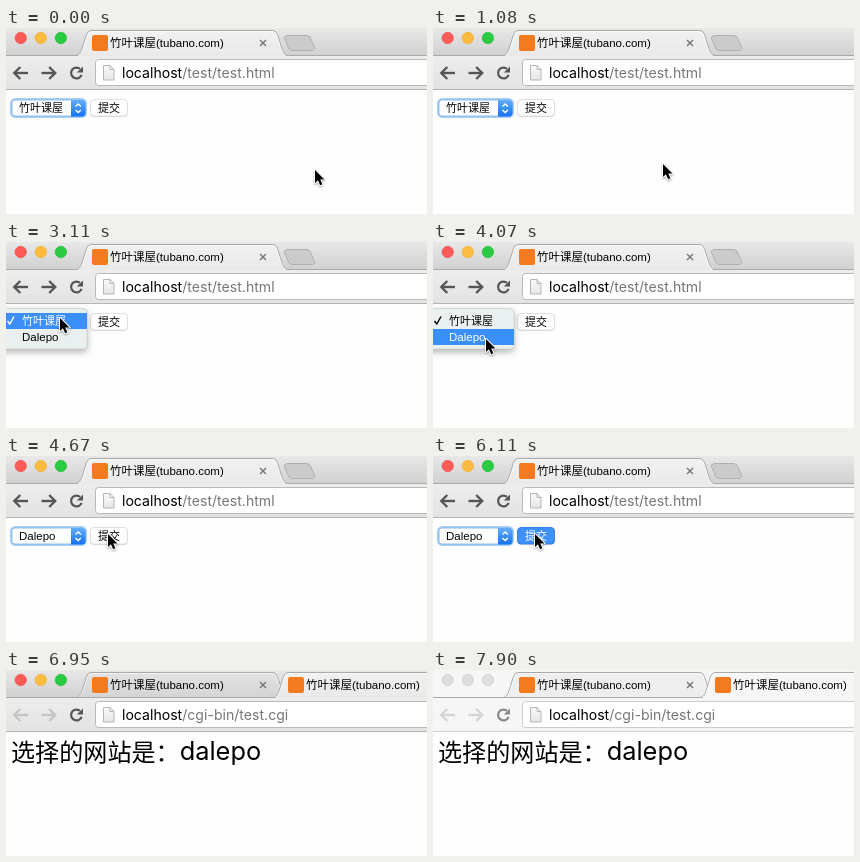
An HTML page with a canvas that plays this animation: 421x186 px, repeating every 8 s.

```html
<!DOCTYPE html>
<html lang="zh">
<head>
<meta charset="utf-8">
<title>Form demo</title>
<style>
html, body { margin: 0; width: 100%; height: 100%; overflow: hidden; background: #fff; }
canvas { display: block; width: 421px; height: 186px; }
</style>
</head>
<body>
<canvas id="stage"></canvas>
<script>
const W = 421, H = 186, LOOP = 8000, TICK = 120;
const FONT = '"Liberation Sans", "Noto Sans CJK SC", sans-serif';
const URL_FONT = 'Inter, sans-serif';
const SITE = '竹叶课屋', OTHER = 'Dalepo', TITLE = SITE + '(tubano.com)';

const canvas = document.getElementById('stage');
const dpr = window.devicePixelRatio || 1;
canvas.width = W * dpr;
canvas.height = H * dpr;
const c = canvas.getContext('2d');

function rect(x, y, w, h, fill) {
  c.fillStyle = fill;
  c.fillRect(x, y, w, h);
}

function box(x, y, w, h, r, fill, stroke, line = 1) {
  c.beginPath();
  c.roundRect(x, y, w, h, r);
  paint(fill, stroke, line);
}

function paint(fill, stroke, line = 1) {
  if (fill) { c.fillStyle = fill; c.fill(); }
  if (stroke) { c.strokeStyle = stroke; c.lineWidth = line; c.stroke(); }
}

function poly(points, close) {
  c.beginPath();
  points.forEach(([x, y], i) => i ? c.lineTo(x, y) : c.moveTo(x, y));
  if (close) c.closePath();
}

function text(s, x, y, size, color = '#000', weight = 400, family = FONT) {
  c.font = `${weight} ${size}px ${family}`;
  c.fillStyle = color;
  c.fillText(s, x, y);
  return x + c.measureText(s).width;
}

function fade(y0, y1, top, bottom) {
  const g = c.createLinearGradient(0, y0, 0, y1);
  g.addColorStop(0, top);
  g.addColorStop(1, bottom);
  return g;
}

// Cursor moves: start time, number of ticks, end point, optional upward bow
const START = [309, 142];
const MOVES = [
  { at: 720, n: 4, to: [230, 136] },
  { at: 1800, n: 7, to: [111.5, 83] },
  { at: 2640, n: 4, to: [54, 76], bow: 22 },
  { at: 3350, n: 2, to: [53, 97] },
  { at: 4310, n: 4, to: [102, 78] },
  { at: 6350, n: 5, to: [378, 182] }
];

function cursorAt(t) {
  let pos = START;
  for (const { at, n, to, bow = 0 } of MOVES) {
    if (t < at) break;
    const p = Math.min(1, (Math.floor((t - at) / TICK) + 1) / n);
    const e = p * p * (3 - 2 * p);
    pos = [
      pos[0] + (to[0] - pos[0]) * e,
      pos[1] + (to[1] - pos[1]) * e - bow * Math.sin(Math.PI * e)
    ];
  }
  return pos;
}

function drawCursor([x, y]) {
  c.save();
  c.translate(x, y);
  c.scale(0.92, 0.92);
  poly([[0, 0], [0, 14.2], [3.2, 11.2], [5.6, 16.6], [8, 15.5], [5.7, 10.3], [10.3, 10.3]], true);
  c.lineJoin = 'round';
  c.shadowColor = 'rgba(0,0,0,.35)';
  c.shadowBlur = 2 * dpr;
  c.shadowOffsetY = dpr;
  paint(null, '#fff', 2.2);
  c.shadowColor = 'transparent';
  paint('#000');
  c.restore();
}

function tabPath(x0, x1, y) {
  c.beginPath();
  c.moveTo(x0, 27.5);
  c.quadraticCurveTo(x0 + 3, 26.5, x0 + 4.5, 22.5);
  c.lineTo(x0 + 9.5, y + 4);
  c.quadraticCurveTo(x0 + 11, y, x0 + 14, y);
  c.lineTo(x1 - 14, y);
  c.quadraticCurveTo(x1 - 11, y, x1 - 9.5, y + 4);
  c.lineTo(x1 - 4.5, 22.5);
  c.quadraticCurveTo(x1 - 3, 26.5, x1, 27.5);
}

function tabShape(x0, x1, fill) {
  tabPath(x0, x1, 2.5);
  paint(fill, '#a9a9a9');
  tabPath(x0 + 1, x1 - 1, 3.5);
  paint(null, 'rgba(255,255,255,.6)');
}

function closeMark(x, y) {
  c.lineCap = 'butt';
  poly([[x - 3, y - 3], [x + 3, y + 3]]);
  paint(null, '#777', 1.4);
  poly([[x + 3, y - 3], [x - 3, y + 3]]);
  paint(null, '#777', 1.4);
}

function page(x, y, w, h, color, fill) {
  const k = 4;
  poly([[x, y], [x + w - k, y], [x + w, y + k], [x + w, y + h], [x, y + h]], true);
  paint(fill, color);
  poly([[x + w - k, y], [x + w - k, y + k], [x + w, y + k]]);
  paint(null, color);
}

function siteTab(x) {
  box(x, 7, 16, 16, 2, '#f47a20');
  text(TITLE, x + 18, 19, 11.5);
}

function arrow(x, dir, color) {
  c.lineCap = 'butt';
  c.lineJoin = 'miter';
  poly([[x + 7.5 * dir, 45], [x - 5.5 * dir, 45]]);
  paint(null, color, 2.4);
  poly([[x - dir * 0.2, 39], [x - 6.2 * dir, 45], [x - dir * 0.2, 51]]);
  paint(null, color, 2.4);
}

function reload(color) {
  c.beginPath();
  c.arc(70.5, 45, 5.4, 0.35, Math.PI * 1.72);
  paint(null, color, 2.2);
  poly([[77, 38.5], [77, 44.6], [70.8, 44.6]], true);
  paint(color);
}

function drawChrome(second, loaded, active) {
  rect(0, 0, W, 29, active ? fade(0, 28, '#e8e8e8', '#d0d0d0') : '#f6f6f6');
  const lights = active ? ['#fc5b57', '#fdbc40', '#2acb42'] : ['#dedede', '#dedede', '#dedede'];
  const rims = active ? ['#f0524c', '#eeae30', '#27bd3c'] : ['#cecece', '#cecece', '#cecece'];
  lights.forEach((color, i) => {
    c.beginPath();
    c.arc(14.7 + 20.1 * i, 10, 5.7, 0, Math.PI * 2);
    paint(color, rims[i], 0.7);
  });

  const tab = active ? fade(3, 28, '#f1f1f1', '#e9e9e9') : '#f6f6f6';
  const idle = active ? fade(3, 28, '#e2e2e2', '#d4d4d4') : '#eeeeee';
  const bar = active ? '#e9e9e9' : '#f6f6f6';
  rect(0, 27, W, 1, '#a9a9a9');
  if (!second) {
    poly([[281, 7.5], [301, 7.5], [304, 9], [309, 20.5], [307, 22.5], [286, 22.5], [283, 21], [278, 9.5]], true);
    paint('#cbcbcb', '#b0b0b0');
  }
  tabShape(71, 281, second ? idle : tab);
  siteTab(86);
  closeMark(257, 15);
  if (second) {
    rect(0, 27, W, 1, '#a9a9a9');
    tabShape(268, 470, tab);
    if (loaded) siteTab(282);
    else {
      page(285.5, 10.5, 9, 12, '#666', '#fff');
      text('无标题', 299.5, 21, 11.5);
    }
  }

  rect(0, 28, W, 33, active ? fade(28, 61, '#ededed', '#e3e3e3') : '#f6f6f6');
  const [x0, x1] = second ? [270, W] : [73, 279];
  rect(x0, 27, x1 - x0, 1, bar);
  rect(0, 61, W, 1, active ? '#b5b5b5' : '#cfcfcf');
  const dim = active ? '#c4c4c4' : '#d4d4d4';
  arrow(14.5, 1, second ? dim : '#555');
  arrow(43, -1, second ? dim : '#555');
  reload(active ? '#555' : '#888');
  box(89.5, 31.5, 345, 26, 3, '#fff', active ? '#b9b9b9' : '#cccccc');
  page(97.5, 37.5, 10.5, 14.5, '#b5b5b5', fade(37, 52, '#fbfbfb', '#e6e6e6'));
  const end = text('localhost', 116, 50, 14.1, '#000', 400, URL_FONT);
  text(second ? '/cgi-bin/test.cgi' : '/test/test.html', end, 50, 14.1, '#777', 400, URL_FONT);
}

function chevron(y, dir) {
  poly([[69.5, y], [72.2, y - 2.6 * dir], [74.9, y]]);
  paint(null, '#fff', 1.4);
}

function drawSelect(value) {
  box(5.5, 71.5, 74, 17, 4, '#fff', '#a9cef5', 3);
  box(6, 72, 73, 16, 3, '#fff', '#76aeea', 0.8);
  box(65, 72, 14.5, 16.5, [0, 3.5, 3.5, 0], fade(72, 88, '#63adfb', '#1673f5'));
  chevron(78.6, 1);
  chevron(82, -1);
  text(value, 13, 84, value === SITE ? 11 : 11.5);
}

function drawButton(pressed) {
  c.save();
  c.shadowColor = 'rgba(0,0,0,.18)';
  c.shadowBlur = dpr;
  c.shadowOffsetY = 0.7 * dpr;
  box(84.5, 71.5, 37, 16.5, 3.5, pressed ? '#3f91f8' : '#fff');
  c.restore();
  box(84.5, 71.5, 37, 16.5, 3.5, null, pressed ? '#2477e8' : '#d9d9d9', 0.8);
  text('提交', 92, 84, 11, pressed ? '#fff' : '#000');
}

function drawMenu(hover, alpha) {
  c.save();
  c.globalAlpha = alpha;
  c.shadowColor = 'rgba(0,0,0,.3)';
  c.shadowBlur = 7 * dpr;
  c.shadowOffsetY = 3 * dpr;
  box(-8, 66.5, 89, 40.5, 4, '#eaf0f0');
  c.shadowColor = 'transparent';
  box(-8, 66.5, 89, 40.5, 4, null, '#c8cccc', 0.7);
  rect(0, hover ? 87 : 71, 81, 16, '#3a90f8');
  const ink = i => i === hover ? '#fff' : '#000';
  poly([[1.5, 79], [3.8, 82], [8, 74.5]]);
  paint(null, ink(0), 1.4);
  text(SITE, 16, 83, 11, ink(0));
  text(OTHER, 16, 99, 11.5, ink(1));
  c.restore();
}

function drawForm(t) {
  drawSelect(t < 4190 ? SITE : OTHER);
  drawButton(t >= 6110);
  if (t >= 3110 && t < 4310) drawMenu(t < 3350 ? 0 : 1, t < 4190 ? 1 : 0.4);
}

function drawResult() {
  const end = text('选择的网站是：', 5, 91, 24.1, '#000', 500, '"Noto Sans CJK SC", sans-serif');
  text(OTHER.toLowerCase(), end, 90, 25.4, '#000', 400, 'Inter, sans-serif');
}

function draw(t) {
  c.setTransform(dpr, 0, 0, dpr, 0, 0);
  rect(0, 0, W, H, '#fefefe');
  const second = t >= 6230;
  drawChrome(second, t >= 6350, t < 7900);
  if (second) drawResult();
  else drawForm(t);
  if (t < 6950) drawCursor(cursorAt(t));
}

const began = performance.now();
function loop() {
  draw((performance.now() - began) % LOOP);
  requestAnimationFrame(loop);
}
loop();
</script>
</body>
</html>
```
